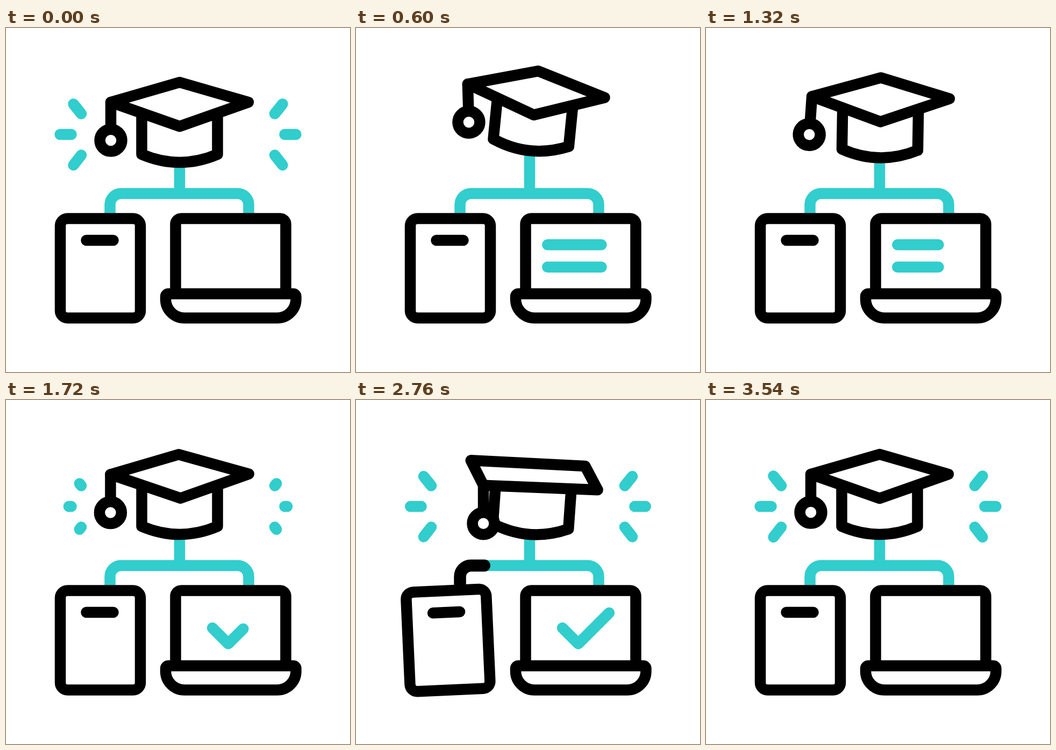
Animation, 640 px wide and 640 px high, one loop 3600 ms. Source, as an HTML page with a canvas:

```html
<!DOCTYPE html>
<html lang="en">
<head>
<meta charset="utf-8">
<title>Online learning</title>
<style>
  html, body { margin: 0; width: 100%; height: 100%; overflow: hidden; background: #fff; }
  canvas { display: block; }
</style>
</head>
<body>
<canvas width="640" height="640"></canvas>
<script>
const ctx = document.querySelector('canvas').getContext('2d');
const LOOP = 3600, LINE = 20.5, BLACK = '#000', TEAL = '#32cdcd';
const RAD = Math.PI / 180;

const shapes = {
  link: 'M193.5 354.5V328.5a20.5 20.5 0 0 1 20.5-20.5H431a20.5 20.5 0 0 1 20.5 20.5V354.5',
  pole: 'M323 215V308',
  book: 'M114.5 354.5H236.5a13.5 13.5 0 0 1 13.5 13.5V526a13.5 13.5 0 0 1-13.5 13.5H114.5a13.5 13.5 0 0 1-13.5-13.5V368a13.5 13.5 0 0 1 13.5-13.5z',
  label: 'M149.5 395H199.5',
  screen: 'M315.5 494V365a10.5 10.5 0 0 1 10.5-10.5H510a10.5 10.5 0 0 1 10.5 10.5V494',
  base: 'M302 494.5H534.5a5 5 0 0 1 5 5v5a35 35 0 0 1-35 35H332a35 35 0 0 1-35-35v-5a5 5 0 0 1 5-5z',
  check: 'M384 424L413.5 453.5L471 396',
  body: 'M252.5 156V235Q323 265 393.5 235V156',
  cord: 'M0 0V48',
  ring: 'M20.5 71a20.5 20.5 0 1 1-41 0a20.5 20.5 0 1 1 41 0z'
};
for (const name in shapes) shapes[name] = new Path2D(shapes[name]);
const LINK_LENGTH = 334.4, CHECK_LENGTH = 123;

const clamp = x => Math.min(1, Math.max(0, x));
const span = (t, a, b) => clamp((t - a) / (b - a));
const ramp = (t, a, b) => (1 - Math.cos(Math.PI * span(t, a, b))) / 2;
const bump = (t, a, b) => Math.sin(Math.PI * span(t, a, b)) ** 2;

function stroke(path, color = BLACK, cap = 'round', width = LINE) {
  ctx.strokeStyle = color;
  ctx.lineWidth = width;
  ctx.lineCap = cap;
  ctx.stroke(path);
}

function solid(path, cap) {
  ctx.fillStyle = '#fff';
  ctx.fill(path);
  stroke(path, BLACK, cap);
}

// Strokes the part of a path between two fractions of its length.
function trim(path, length, from, to, color, width) {
  if (to - from < 0.001) return;
  ctx.setLineDash([(to - from) * length, length * 3]);
  ctx.lineDashOffset = -from * length;
  stroke(path, color, 'round', width);
  ctx.setLineDash([]);
}

function segment(x1, y1, x2, y2, from, to) {
  if (to - from < 0.001) return;
  const at = k => [x1 + (x2 - x1) * k, y1 + (y2 - y1) * k];
  const path = new Path2D();
  path.moveTo(...at(from));
  path.lineTo(...at(to));
  stroke(path, TEAL);
}

function turn(x, y, degrees) {
  ctx.translate(x, y);
  ctx.rotate(degrees * RAD);
  ctx.translate(-x, -y);
}

function drawSparks(t) {
  const growing = t > 1000;
  const from = growing ? 0 : ramp(t, 0, 400);
  const to = growing
    ? 0.22 * span(t, 1600, 1720) + 0.25 * span(t, 1720, 2320) + 0.53 * span(t, 2320, 2790)
    : 1;
  for (const side of [-1, 1]) {
    const ray = (x1, y1, x2, y2) =>
      segment(320 + side * x1, 198 + y1, 320 + side * x2, 198 + y2, from, to);
    ray(198.5, 0, 219.5, 0);
    ray(180, -38.5, 194.5, -56.5);
    ray(180, 38.5, 194.5, 57);
  }
}

function drawLink(t) {
  stroke(shapes.pole, TEAL, 'butt');
  stroke(shapes.link, TEAL, 'butt');
  const head = 1 - ramp(t, 1720, 2300), tail = 1 - ramp(t, 1964, 3156);
  trim(shapes.link, LINK_LENGTH, head, tail, BLACK, 22.5);
}

function drawBook(t) {
  ctx.save();
  turn(175.5, 540, 4 * Math.sin(2 * Math.PI * span(t, 2395, 2995)));
  solid(shapes.book);
  stroke(shapes.label);
  ctx.restore();
}

function drawLaptop(t) {
  solid(shapes.screen, 'butt');
  solid(shapes.base);
  const text = ramp(t, 0, 310) - ramp(t, 1220, 1530);
  for (const y of [403.3, 444.7]) segment(356.3, y, 456.5, y, 0, text);
  const check = ramp(t, 1534, 1844) - ramp(t, 3230, 3540);
  trim(shapes.check, CHECK_LENGTH, 0, check, TEAL);
}

function drawCap(t) {
  const lift = -26 * bump(t, 0, 1640);
  const tilt = 6 * (ramp(t, 0, 410) - ramp(t, 410, 1640) + bump(t, 1680, 3240));
  const yaw = 90 * RAD * (ramp(t, 1680, 2370) - ramp(t, 2370, 3240));
  const wave = Math.sin(2 * Math.PI * span(t, 0, 1640));
  const swing = -wave * (wave > 0 ? 2.3 : 4.2) + 2.7 * bump(t, 1680, 2740);

  // The board widens and flattens halfway through its quarter turn.
  const skew = Math.sin(2 * yaw);
  const corner = k => {
    const a = yaw + k * Math.PI / 2, c = Math.cos(a);
    return [
      323 - 128 * (1 + 0.19 * skew) * c,
      142 - 4 * c * c + 41 * (1 - 0.25 * skew) * Math.sin(a)
    ];
  };
  const board = new Path2D();
  for (let k = 0; k < 4; k++) board.lineTo(...corner(k));
  board.closePath();

  ctx.save();
  ctx.translate(0, lift);
  turn(323, 262, tilt);
  solid(shapes.body, 'butt');
  solid(board);
  ctx.translate(...corner(0));
  ctx.rotate((swing - tilt) * RAD);
  stroke(shapes.cord);
  solid(shapes.ring);
  ctx.restore();
}

function frame(now) {
  const t = now % LOOP;
  ctx.clearRect(0, 0, 640, 640);
  ctx.lineJoin = 'round';
  drawSparks(t);
  drawLink(t);
  drawBook(t);
  drawLaptop(t);
  drawCap(t);
  requestAnimationFrame(frame);
}
frame(performance.now());
</script>
</body>
</html>
```
